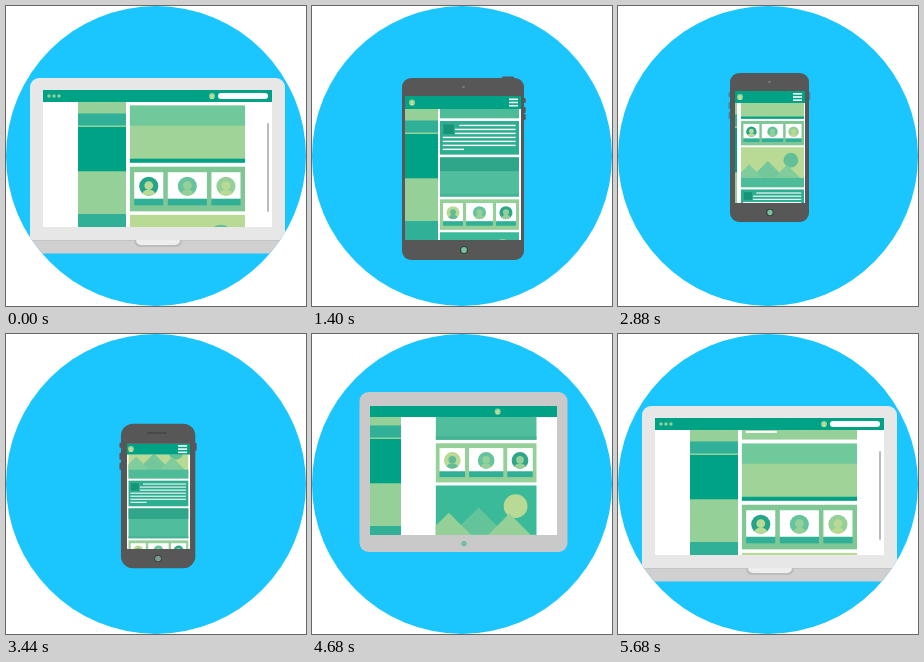
An HTML page with a canvas for the animation above (5.72 s loop, 300 by 300 pixels).

```html
<!DOCTYPE html>
<html lang="en">
<head>
<meta charset="utf-8">
<title>Responsive devices</title>
<style>
html, body { margin: 0; width: 100%; height: 100%; overflow: hidden; background: #fff; }
canvas { display: block; width: 300px; height: 300px; }
</style>
</head>
<body>
<canvas id="stage" width="300" height="300"></canvas>
<script>
const LOOP = 5720;
const ctx = document.getElementById('stage').getContext('2d');
const dark = '#00a285', teal = '#2fb097', mid = '#50be9c', light = '#95d098', pale = '#b9da94';

// Body: L T R B, screen: l t r b, page columns: c0-c1 (side) and n0-n1 (main).
const laptop = { L: 24, T: 72, R: 279, B: 235, l: 37, t: 84, r: 266, b: 221, bar: 12, base: 12.5,
  c0: 72, c1: 120, n0: 123.7, n1: 239, side: 0, av: 206, menuX: 261, rad: 9,
  red: 231, green: 231, blue: 231,
  lap: 1, menu: 0, cam: 0, speaker: 0, slot: 0, icon: 0, home: 0, tabKeys: 0, phoneKeys: 0 };
const tablet = { ...laptop, L: 50, T: 53, R: 252, B: 225, l: 60, t: 67, r: 243, b: 207, base: 0,
  c0: 81, c1: 122.5, n0: 125, n1: 226, av: 163, menuX: 238, red: 176, green: 176, blue: 176,
  lap: 0, cam: 1, slot: 1, icon: 1 };
const upright = { ...tablet, L: 90, T: 72, R: 212, B: 254, l: 93, t: 90, r: 209, b: 234, bar: 13,
  c0: 93, c1: 126, n0: 128, n1: 207, av: 100, menuX: 206, red: 87, green: 87, blue: 87,
  menu: 1, slot: 0, icon: 0, home: 4, tabKeys: 1 };
const raised = { ...upright, T: 54, B: 236, t: 72, b: 216 };
const phone = { ...upright, L: 112, T: 67, R: 191, B: 216, l: 117, t: 85, r: 187, b: 197, bar: 12,
  c0: 86, c1: 119, n0: 123, n1: 186, av: 122, menuX: 184, home: 3.7, tabKeys: 0, phoneKeys: .5 };
const smallPhone = { ...phone, L: 115, T: 87.3, R: 189.3, B: 232.3, l: 121, t: 107, r: 184, b: 213,
  bar: 11, c0: 85, c1: 118, n0: 122.3, n1: 182.5, av: 125, menuX: 181, rad: 12,
  cam: 0, speaker: 1, phoneKeys: 1 };
const paleTablet = { ...tablet, L: 47.5, T: 58, R: 255.5, B: 218, l: 58, t: 72, r: 245, b: 201, bar: 11,
  c0: 48, c1: 89, n0: 123.6, n1: 224.7, side: -3, av: 185.7, menuX: 240,
  red: 201, green: 201, blue: 201, cam: 0, slot: 0, icon: 0, home: 2.6 };

// Horizontal and vertical timing as [start, duration, overshoot].
const moves = [
  { to: tablet, x: [600, 190, .8], y: [470, 170, 1] },
  { to: upright, x: [1000, 190, .6], y: [1120, 230, 1.2] },
  { to: raised, x: [1840, 540, 0], y: [1840, 540, 0] },
  { to: phone, x: [2420, 280, .8], y: [2420, 280, .8] },
  { to: smallPhone, x: [3100, 460, 0], y: [3100, 460, 2.8] },
  { to: paleTablet, x: [4260, 300, 1], y: [4260, 300, 1] },
  { to: laptop, x: [4720, 460, 3.6], y: [4720, 400, 1.2] }
];
const vertical = new Set(['T', 'B', 't', 'b', 'bar', 'base', 'side']);
const spatial = new Set(['L', 'R', 'l', 'r', 'c0', 'c1', 'n0', 'n1', 'av', 'menuX']);

const clamp = v => Math.max(0, Math.min(1, v));
function easeBack(t, [start, span, s]) {
  const p = clamp((t - start) / span) - 1;
  return 1 + (s + 1) * p ** 3 + s * p * p;
}

function poseAt(t) {
  const pose = { ...laptop };
  for (const m of moves) {
    const ex = easeBack(t, m.x), ey = easeBack(t, m.y);
    for (const k in pose) {
      const e = vertical.has(k) ? ey : spatial.has(k) ? ex : clamp(ex);
      pose[k] += (m.to[k] - pose[k]) * e;
    }
  }
  return pose;
}

const scrollKeys = [[0, 365.2], [560, 512], [840, 522], [1400, 537.5], [1900, 645], [2400, 755],
  [2880, 875], [3300, 960], [4000, 1060], [4680, 1117], [5200, 1205], [5680, 1311.2], [5720, 1321.2]];
function slope(i) {
  const n = scrollKeys.length - 1;
  if (i === 0 || i === n) return .25;
  const a = scrollKeys[i - 1], b = scrollKeys[i], c = scrollKeys[i + 1];
  const s0 = (b[1] - a[1]) / (b[0] - a[0]), s1 = (c[1] - b[1]) / (c[0] - b[0]);
  return 2 * s0 * s1 / (s0 + s1);
}
function scrollAt(t) {
  let i = 0;
  while (i < scrollKeys.length - 2 && t >= scrollKeys[i + 1][0]) i++;
  const [t0, y0] = scrollKeys[i], [t1, y1] = scrollKeys[i + 1];
  const h = t1 - t0, p = (t - t0) / h, q = 1 - p;
  return y0 * (1 + 2 * p) * q * q + y1 * p * p * (3 - 2 * p)
    + h * p * q * (q * slope(i) - p * slope(i + 1));
}

function rect(x, y, w, h, fill) {
  ctx.fillStyle = fill;
  ctx.fillRect(x, y, w, h);
}
function round(x, y, w, h, r, fill) {
  ctx.fillStyle = fill;
  ctx.beginPath();
  ctx.roundRect(x, y, Math.max(0, w), Math.max(0, h), r);
  ctx.fill();
}
function disc(x, y, r, fill) {
  ctx.fillStyle = fill;
  ctx.beginPath();
  ctx.arc(x, y, r, 0, 7);
  ctx.fill();
}
function peak(x, y, base, fill) {
  const w = base - y;
  ctx.fillStyle = fill;
  ctx.beginPath();
  ctx.moveTo(x - w, base);
  ctx.lineTo(x, y);
  ctx.lineTo(x + w, base);
  ctx.fill();
}
function clipped(path, draw) {
  ctx.save();
  ctx.beginPath();
  path();
  ctx.clip();
  draw();
  ctx.restore();
}
const inRect = (x, y, w, h, draw) => clipped(() => ctx.rect(x, y, w, h), draw);
const inDisc = (x, y, r, draw) => clipped(() => ctx.arc(x, y, r, 0, 7), draw);
function faded(alpha, draw) {
  if (alpha < .01) return;
  ctx.save();
  ctx.globalAlpha = alpha;
  draw();
  ctx.restore();
}

function person(x, y, r, back, skin) {
  disc(x, y, r, back);
  inDisc(x, y, r, () => {
    disc(x, y - r * .08, r * .46, skin);
    ctx.beginPath();
    ctx.ellipse(x, y + r * .95, r * .75, r * .62, 0, 0, 7);
    ctx.fill();
  });
}

// Page sections are drawn in a column 115 units wide.
const hero = (sky, hill, backHill, sun, ground) => () => {
  rect(0, 0, 115, 73, sky);
  disc(91, 23.5, 13.5, sun);
  peak(49, 25, 57, backHill);
  peak(15, 31, 57, hill);
  peak(84, 32, 57, hill);
  rect(0, 56, 115, 17, ground);
};
const article = (back, square) => () => {
  rect(0, 0, 115, 49, back);
  rect(5, 5, 15, 14, square);
  [[28, 110], [22, 110], [22, 110], [4, 110], [4, 110], [4, 110], [4, 35]].forEach(([a, b], i) =>
    rect(a, 5.5 + i * 5.8, b - a, 2, '#fff'));
};
const banner = (top, body, foot) => () => {
  rect(0, 0, 115, 57, body);
  rect(0, 0, 115, 20, top);
  rect(0, 53, 115, 4, foot);
};
const team = (back, strip, people) => () => {
  rect(0, 0, 115, 44.5, back);
  people.forEach(([a, b], i) => {
    const center = 19 + i * 38.5, w = i === 1 ? 39 : 29;
    rect(center - w / 2, 5.5, w, 26.5, '#fff');
    rect(center - w / 2, 32, w, 6.5, strip);
    person(center, 19.5, 9.5, a, b);
  });
};
const sections = [
  [73, hero(pale, '#81cc9c', '#74c79b', '#62bf98', '#4ebc99')],
  [49, article('#2eae90', '#159477')],
  [57, banner('#2fa58a', mid, '#45b494')],
  [44, team(light, teal, [[pale, '#62bd96'], ['#65c49e', light], ['#2fa58a', light]])],
  [73, hero('#3aba98', light, '#64c499', pale, light)],
  [49, article(light, mid)],
  [57, banner('#70c99b', '#9fd398', dark)],
  [44, team('#80c796', teal, [['#24a489', pale], ['#65c49e', light], [light, pale]])]
];
const GAP = 4;
const pageHeight = sections.reduce((sum, s) => sum + s[0] + GAP, 0);

function mainColumn(p, top, scroll) {
  const w = p.n1 - p.n0, k = w / 115, view = (p.b - top) / k;
  let y = -(scroll % pageHeight);
  inRect(p.n0, top, w, p.b - top, () => {
    for (let i = 0; y < view; i++) {
      const [h, draw] = sections[i % sections.length];
      if (y + h > 0) {
        ctx.save();
        ctx.translate(p.n0, top + y * k);
        ctx.scale(k, k);
        draw();
        ctx.restore();
      }
      y += h + GAP;
    }
  });
}

function sideColumn(p, top) {
  const w = p.c1 - p.c0;
  [[0, light], [11.5, teal], [23.5, light], [25, dark], [69.3, light], [112, teal]].forEach(([y, fill]) =>
    rect(p.c0, top + p.side + y, w, 200, fill));
}

function toolbar(p) {
  const y = p.t + p.bar / 2;
  rect(p.l, p.t, p.r - p.l, p.bar, dark);
  person(p.av, y, 3, light, '#c9dc9c');
  faded(p.lap, () => {
    [6, 11, 16].forEach(dx => disc(p.l + dx, y, 1.7, light));
    round(p.r - 54, y - 3, 50, 6, 3, '#fff');
  });
  faded(p.menu, () => [-3.2, 0, 3.2].forEach(dy => rect(p.menuX - 9, y + dy - .8, 9, 1.6, '#fff')));
  faded(p.icon, () => {
    rect(p.menuX - 5, y - 2.5, 4, 1.4, '#fff');
    rect(p.menuX - 4, y + .5, 2, 1.5, '#fff');
  });
}

function keys(p, fill) {
  faded(p.tabKeys, () => {
    round(190, p.T - 1.5, 12, 4, 1, fill);
    [20, 29, 36].forEach((dy, i) => round(p.R - 2, p.T + dy, 3.7, i ? 6 : 5, 1, fill));
  });
  faded(p.phoneKeys, () => {
    [[19, 5], [29, 7], [39, 7]].forEach(([dy, h]) => round(p.L - 1.5, p.T + dy, 4, h, 1, fill));
    round(p.R - 2, p.T + 19, 3.3, 8, 1, fill);
  });
}

function device(p, scroll) {
  const fill = `rgb(${p.red},${p.green},${p.blue})`, w = p.R - p.L, top = p.t + p.bar;
  keys(p, fill);
  if (p.base > .3) rect(p.L, p.B - 1, w, p.base + 1, '#d0d0d0');
  round(p.L, p.T, w, p.B - p.T, [p.rad, p.rad, p.rad * (1 - p.lap), p.rad * (1 - p.lap)], fill);
  faded(p.lap, () => {
    rect(p.L, p.B - 1, w, 1, '#c4c4c4');
    round(128, p.B - 1, 48, 7, [0, 0, 6, 6], '#bdbdbd');
    round(130, p.B - 1, 44, 5, [0, 0, 5, 5], '#eeeeee');
  });

  inRect(p.l, p.t, p.r - p.l, p.b - p.t, () => {
    rect(p.l, p.t, p.r - p.l, p.b - p.t, '#fff');
    sideColumn(p, top);
    mainColumn(p, top, scroll);
    faded(p.lap, () => round(p.r - 5, p.t + 33, 2, 89, 1, '#bcbcbc'));
    toolbar(p);
  });

  const head = (p.T + p.t) / 2, foot = (p.B + p.b) / 2;
  faded(p.cam, () => disc(151.5, head, 1.3, '#777'));
  faded(p.speaker, () => round(141, head - 1.3, 20, 1.2, .6, '#3c3c3c'));
  faded(p.slot, () => round(148, foot, 8, 1.8, 1, '#e8e8e8'));
  if (p.home > .2) {
    disc(152, foot, p.home, p.menu > .5 ? '#333f3b' : '#62b795');
    disc(152, foot, p.home * .72, '#78c19c');
    faded(p.speaker, () => disc(152, foot, p.home * .72, '#7f9a8e'));
  }
}

function frame(now) {
  const t = now % LOOP;
  rect(0, 0, 300, 300, '#fff');
  disc(150, 150, 150, '#1bc6ff');
  inDisc(150, 150, 150, () => device(poseAt(t), scrollAt(t)));
}

const begin = performance.now();
function tick() {
  frame(performance.now() - begin);
  requestAnimationFrame(tick);
}
tick();
</script>
</body>
</html>
```
